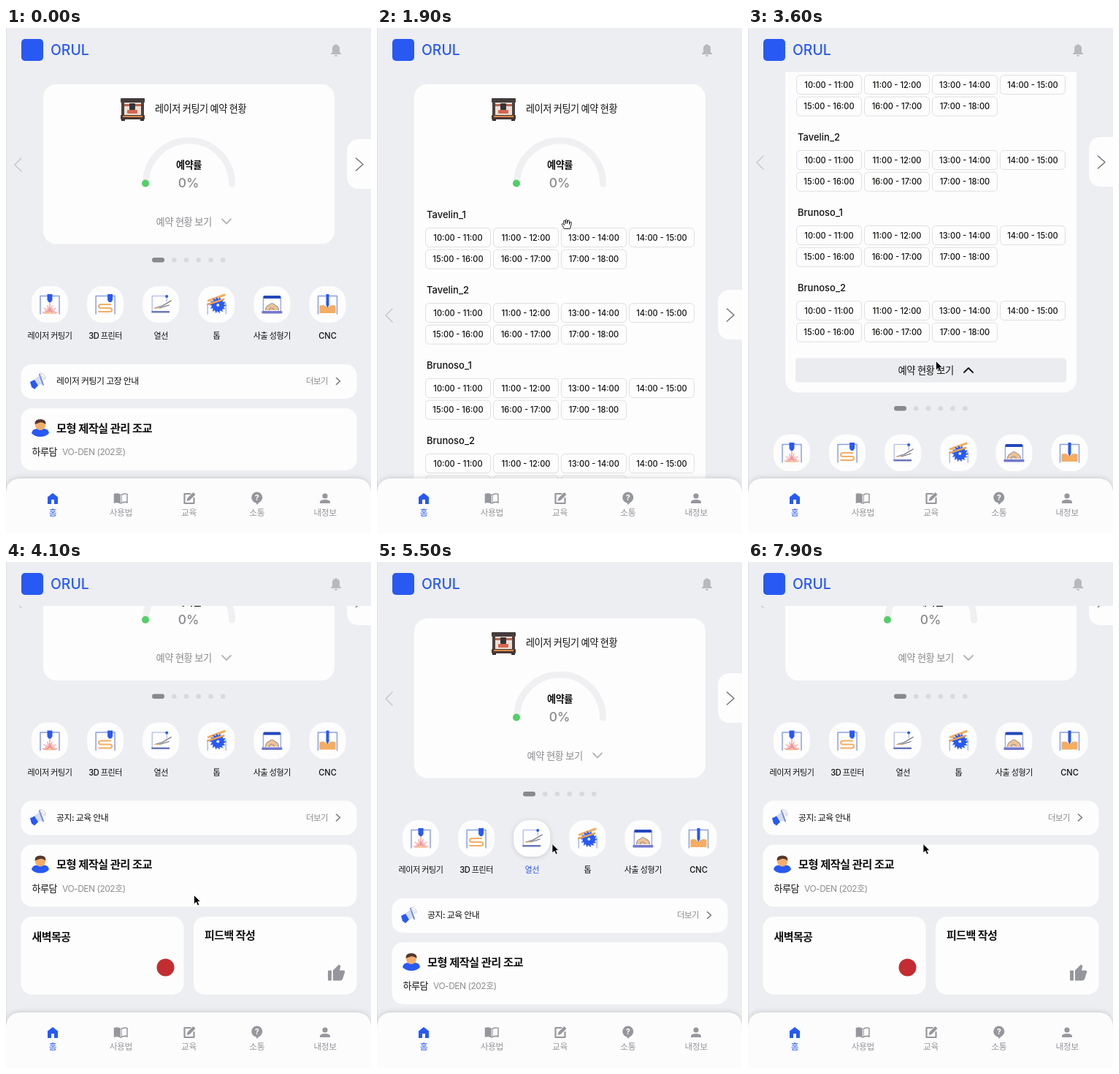
An HTML page that plays this animation: 500x692 px, repeating every 8000 ms.

```html
<!DOCTYPE html>
<html lang="ko">
<head>
<meta charset="utf-8">
<style>
html, body { margin: 0; width: 100%; height: 100%; overflow: hidden; background: #edeef2; }
svg { display: block; width: 500px; height: 692px; font-family: Inter, "Noto Sans CJK KR", "Noto Sans CJK", sans-serif; }
.ko { letter-spacing: -.04em; }
.card { fill: #fdfdfd; }
.line { fill: none; stroke-linecap: round; stroke-linejoin: round; }
</style>
</head>
<body>
<svg id="stage" viewBox="0 0 500 692"></svg>
<script>
const LOOP = 8000, EXTRA = 412, MAX_SCROLL = 133.5;
const BLUE = '#2859f3', GRAY = '#96979c', INK = '#111';

const text = (x, y, str, size, { fill = INK, weight = 500, anchor = 'start', id = '' } = {}) =>
  `<text ${id && `id="${id}"`} class="${/[가-힣]/.test(str) ? 'ko' : ''}" x="${x}" y="${y}" font-size="${size}"
    font-weight="${weight}" fill="${fill}" text-anchor="${anchor}">${str}</text>`;
const rect = (x, y, w, h, r, fill, more = '') =>
  `<rect x="${x}" y="${y}" width="${w}" height="${h}" rx="${r}" fill="${fill}" ${more}/>`;
const card = (x, y, w, h, r = 15) => rect(x, y, w, h, r, '#fdfdfd');
const line = (d, color, width = 1.5, more = '') =>
  `<path class="line" d="${d}" stroke="${color}" stroke-width="${width}" ${more}/>`;
const shape = (d, fill, more = '') => `<path d="${d}" fill="${fill}" ${more}/>`;
const dot = (x, y, r, fill) => `<circle cx="${x}" cy="${y}" r="${r}" fill="${fill}"/>`;
const group = (content, attrs) => `<g ${attrs}>${content}</g>`;
const times = (n, make) => Array.from({ length: n }, (_, i) => make(i)).join('');

// Machine icons are drawn around (0, 0).
const frame = line('M-13 13V-11.500H13V13', '#8c9fe4', 1.5);
const rays = times(11, i => {
  const a = Math.PI * (1 + i / 10), r = i % 2 ? 7 : 10;
  return line(`M${2 * Math.cos(a)} ${11 + 2 * Math.sin(a)}L${r * Math.cos(a)} ${11 + r * Math.sin(a)}`, '#ef7b7b', .9);
});
const teeth = Array.from({ length: 28 }, (_, i) => {
  const r = i % 2 ? 8 : 11.5, a = i * Math.PI / 14 + (i % 2 ? .14 : 0);
  return `${(2 + r * Math.cos(a)).toFixed(1)} ${(1 + r * Math.sin(a)).toFixed(1)}`;
}).join('L');

const machines = [
  ['레이저 커팅기', frame + line('M0-3V10', '#ef7b7b', 1) + rays
    + shape('M-3.500-14H3.500V-6L1.500-3H-1.500L-3.500-6Z', BLUE) + line('M-8 12H8', '#f5b98a', 1.5)],
  ['3D 프린터', frame + line('M7 0H-6Q-9 0-9 2.500T-6 5H6Q9 5 9 7.500T6 10H-9', '#f3ae61', 2)
    + shape('M3-14H10V-6L8-3H5L3-6Z', BLUE)],
  ['열선', line('M-12 9V-11.500H8V-4', '#a7b4e8', 1.2) + rect(-13, 9, 25, 2.5, 1, '#6b78b8')
    + line('M-8 5L2 2L14-5M-2 5L11 1', '#6a6b75', 1.2) + line('M-9 5H-3', '#efab69', 1.2) + dot(8, -11, 2, BLUE)],
  ['톱', line('M-12 13V-1H13V13', '#a7b4e8', 1.4) + line('M-11-5L11-13', '#f3ae61', 3)
    + shape(`M${teeth}Z`, BLUE) + dot(2, 1, 2, '#e9edff') + line('M-12 0L10-7', '#e9a257', 2.5)],
  ['사출 성형기', rect(-12, -9, 24, 19, 0, '#fff', 'stroke="#91a3e6" stroke-width="1.3"')
    + rect(-12, -12, 24, 4, 1.5, '#2348bd') + shape('M-9 8Q-8 1-4 1Q0-4 4 1Q9 3 9 8Z', '#f0c294')
    + line('M-9 8Q-8 1-4 1Q0-4 4 1Q9 3 9 8M-4 8Q-2 2 3 7', '#93949c', 1.2) + rect(-14, 9, 28, 3.5, 1, '#7378cc')],
  ['CNC', frame + shape('M-11 2Q-7 0-3 2L0 5L3 2Q7 0 11 2V12H-11Z', '#f4ad61')
    + shape('M-2-14H2V1L0 5L-2 1Z', BLUE)],
];

const machineRow = machines.map(([name, icon], i) => {
  const x = 60 + i * 76.1;
  return rect(x - 25, 353, 50, 50, 21, '#fdfdfd', i === 2 ? 'id="wireTile"' : '')
    + group(icon, `transform="translate(${x} 378)"`)
    + text(x, 425, name, 11.1, { anchor: 'middle', id: i === 2 ? 'wireLabel' : '' });
}).join('');

const cutterPicture = rect(157, 96, 33, 6, 1, '#443b3b') + rect(158, 99, 4, 26, 1, '#4b4140')
  + rect(185, 99, 4, 26, 1, '#4b4140') + rect(162, 102, 23, 18, 0, '#f0ded3')
  + rect(162, 104, 23, 3, 0, '#b9674f') + rect(169, 103, 8, 9, 1, '#35343b')
  + rect(166, 112, 14, 5, 1, '#d5674f') + rect(157, 119, 33, 6, 1, '#4a3935')
  + rect(160, 120, 27, 2, 0, '#d58a48') + rect(158, 125, 5, 2, 0, '#2f2b2c') + rect(184, 125, 5, 2, 0, '#2f2b2c');

const slots = [10, 11, 13, 14, 15, 16, 17];
const schedule = ['Tavelin_1', 'Tavelin_2', 'Brunoso_1', 'Brunoso_2'].map((name, g) => {
  const top = 260 + g * 103;
  return text(68, top, name, 13) + slots.map((hour, i) => {
    const x = 66.5 + i % 4 * 93, y = top + 13.5 + (i > 3) * 29.7;
    return rect(x, y, 89, 26, 5, '#fdfdfd', 'stroke="#dedfe3"')
      + text(x + 44.5, y + 17, `${hour}:00 - ${hour + 1}:00`, 11.1, { anchor: 'middle' });
  }).join('');
}).join('');

const megaphone = shape('M36 483L46 475L50 487L40 489Z', '#d5dcf2') + shape('M33 484L39 481L44 489L39 494L35 491Z', BLUE)
  + line('M46 474L51 488', '#7189d4', 2) + line('M46 476Q52 475 52 481M46 472Q54 472 54 480', '#c4c8d4', 1);
const manager = shape('M35 554Q36 548 43 548H52Q58 548 59 554Q55 559 47 559T35 554Z', BLUE)
  + dot(47, 543, 7, '#f3ad6a') + shape('M39.500 542Q39 535 47 535T54.500 542Q49 538 45 540Z', '#53372f');
const thumb = rect(441, 692, 5, 14, 1, GRAY)
  + shape('M448 706V692L456 684Q459 685 458 688L457 692H462Q465 692 464 695L461 704Q460 706 458 706Z', GRAY);

const below = rect(200, 314, 17, 6.5, 3.25, '#89898d') + times(5, i => dot(230.3 + i * 16.75, 317.2, 3.3, '#d8d9dd'))
  + machineRow
  + card(20.5, 460, 460, 47) + megaphone + text(69, 487, '공지', 11.9, { id: 'notice' })
  + text(411, 487, '더보기', 11.4, { fill: '#8d8d91', weight: 400 }) + line('M452.500 478.500L457.500 483L452.500 487.500', '#77777b', 1.6)
  + card(20.5, 520, 460, 85) + manager
  + text(69, 552.5, '모형 제작실 관리 조교', 15.3, { weight: 600 })
  + text(35.5, 584, '하루담', 13) + text(77, 584, 'VO-DEN (202호)', 12, { fill: '#8d8d91', weight: 400 })
  + card(20.5, 618.5, 223, 106.5) + text(35.5, 651.5, '새벽목공', 15, { weight: 600 }) + dot(218.5, 688, 12, '#c32c30')
  + card(257, 618.5, 223.5, 106.5) + text(272, 649.5, '피드백 작성', 15, { weight: 600 }) + thumb;

const page = `<rect id="slide" class="card" x="51" y="77" width="399" rx="18"/>`
  + cutterPicture + text(204, 115, '레이저 커팅기 예약 현황', 13.2)
  + line('M191.500 213A59 59 0 0 1 309.500 213', '#f0f0f3', 9) + dot(191, 212.5, 5, '#53cf68')
  + text(250.5, 192, '예약률', 13.2, { weight: 600, anchor: 'middle' })
  + text(250, 218, '0%', 17.5, { fill: '#8a8a8e', anchor: 'middle' })
  + group(schedule, 'clip-path="url(#listClip)"')
  + group(rect(65, 248.5, 371, 33, 4, '#ebecf0', 'id="toggleBack"')
    + text(205.5, 269.5, '예약 현황 보기', 13.3, { id: 'toggleLabel' })
    + line('', INK, 1.8, 'id="toggleArrow"'), 'id="toggle"')
  + group(line('M21 178L12 187L21 196', '#c6c7ca', 1.5)
    + shape('M500 152H485Q467 152 467 170V202Q467 220 485 220H500Z', '#fdfdfd')
    + line('M479.500 178L489 186.500L479.500 195', '#77777b', 1.6), 'id="arrows"')
  + group(below, 'id="below"');

const header = rect(0, 0, 500, 60, 0, '#edeef2') + rect(21, 15, 30, 30, 5, BLUE)
  + text(61, 37, 'ORUL', 19.4, { fill: BLUE })
  + shape('M445 35L447 33V28Q447 23.500 451 23Q452 20.500 453 23Q457 23.500 457 28V33L459 35V36H445ZM450 37H454Q454 39 452 39T450 37Z', '#b8b9bc');

const navItems = [
  ['홈', shape('M-7-1.500L0-7L7-1.500V8H2V2H-2V8H-7Z', BLUE)],
  ['사용법', shape('M-9.500-6Q-4-8 0-5Q4-8 9.500-6V7Q4 5 0 8Q-4 5-9.500 7Z', GRAY) + line('M0-4V6', '#fdfdfd', 1)
    + shape('M1.500-4Q5-6 8-5V4.500Q4 4 1.500 5.500Z', '#fdfdfd')],
  ['교육', line('M2-6H-6V7H7V0', GRAY, 2.2) + line('M-2 3L-1 0L6-7L8-5L1 2Z', GRAY, 1.5, 'style="fill:#96979c"')],
  ['소통', dot(0, -1, 7.5, GRAY) + shape('M-2 5H4L0 9Z', GRAY)
    + text(0, 3, '?', 11, { fill: '#fdfdfd', weight: 700, anchor: 'middle' })],
  ['내정보', dot(0, -3, 3.6, GRAY) + shape('M-7 7V5Q-6 2 0 2T7 5V7Z', GRAY)],
];
const nav = shape('M0 692V638Q0 616 22 616H478Q500 616 500 638V692Z', '#fcfcfd', 'filter="url(#navShadow)"')
  + navItems.map(([name, icon], i) => {
    const x = 64 + i * 93.25;
    return group(icon, `transform="translate(${x} 643)"`)
      + text(x, 667, name, 11.8, { fill: i ? GRAY : BLUE, anchor: 'middle' });
  }).join('');

const pointer = shape('M0 0V12.500L3 9.800L5 14.300L7.300 13.300L5.300 9H9Z', '#000', 'stroke="#fff" stroke-width=".8"');
const hand = shape('M-3 6L-6 1Q-7-1-5-1L-3 1L-4-4Q-4-6-2-5L-1-1V-6Q0-8 1-6L1-1L2-5Q4-7 4-4L4 0L5-3Q7-4 7-2L5 6Z', '#fff',
  'stroke="#222" stroke-width="1" stroke-linejoin="round"');

const shadow = (id, dy, blur, alpha) =>
  `<filter id="${id}" x="-30%" y="-30%" width="160%" height="160%"><feDropShadow dx="0" dy="${dy}" stdDeviation="${blur}" flood-opacity="${alpha}"/></filter>`;

document.getElementById('stage').innerHTML =
  `<defs>${shadow('navShadow', -1, 3, .16)}${shadow('tileShadow', 1, 3, .16)}
    <clipPath id="listClip"><rect id="listWindow" x="51" y="240" width="399"/></clipPath></defs>`
  + rect(0, 0, 500, 692, 0, '#edeef2') + group(page, 'id="page"') + header
  + rect(0, 0, 1, 692, 0, '#dfe0e4') + nav
  + group(pointer, 'id="pointer"') + group(hand, 'id="hand"');

const el = id => document.getElementById(id);
const set = (id, attrs) => Object.entries(attrs).forEach(([key, value]) => el(id).setAttribute(key, value));
const move = (id, x, y) => set(id, { transform: `translate(${x} ${y})` });
const show = (id, on) => set(id, { visibility: on ? 'visible' : 'hidden' });
const progress = (t, start, length) => Math.min(1, Math.max(0, (t - start) / length));
const easeOut = p => 1 - (1 - p) ** 2;
const easeInOut = p => p * p * (3 - 2 * p);

// Each move: start time, duration, destination.
const cursorMoves = [[600, 500, 259.5, 267.5], [3000, 450, 257.5, 455.5], [4400, 500, 240, 385.5]];

function draw(t) {
  const extra = EXTRA * (easeInOut(progress(t, 1500, 350)) - easeInOut(progress(t, 3700, 350)));
  const open = t >= 1500 && t < 3700;
  const scroll = t < 4200 ? Math.min(209 * easeOut(progress(t, 1985, 1000)), MAX_SCROLL + extra)
    : MAX_SCROLL * (1 - easeOut(progress(t, 4200, 500)) + easeOut(progress(t, 5750, 1000)));

  let x = 330, y = 700;
  for (const [start, length, toX, toY] of cursorMoves) {
    const p = easeInOut(progress(t, start, length));
    x += (toX - x) * p;
    y += (toY - y) * p;
  }

  const pageY = y + scroll;
  const onToggle = x > 65 && x < 436 && Math.abs(pageY - 265 - extra) < 16.5;
  const onCard = x > 51 && x < 450 && pageY > 77 && pageY < 295.5 + extra;
  const onWire = t >= 4850 && t < 6900;

  move('page', 0, -scroll);
  move('below', 0, extra);
  move('toggle', 0, extra);
  move('arrows', 0, extra / 2);
  set('slide', { height: 218.5 + extra });
  set('listWindow', { height: extra });
  show('toggleBack', onToggle);
  set('toggleLabel', { fill: onToggle ? INK : '#8b8b8f' });
  set('toggleArrow', {
    d: open ? 'M296 268L302 262L308 268' : 'M296 261.500L302 267.500L308 261.500',
    stroke: onToggle ? INK : '#b4b5b8',
  });
  set('wireTile', { filter: onWire ? 'url(#tileShadow)' : 'none' });
  set('wireLabel', { fill: onWire ? BLUE : INK });
  el('notice').textContent = t < 3000 ? '레이저 커팅기 고장 안내' : '공지: 교육 안내';

  const grabbing = onCard && !onToggle;
  show('pointer', !grabbing);
  show('hand', grabbing);
  move('pointer', x, y);
  move('hand', x, y + 1);
}

function tick() {
  draw(performance.now() % LOOP);
  requestAnimationFrame(tick);
}
tick();
</script>
</body>
</html>
```
